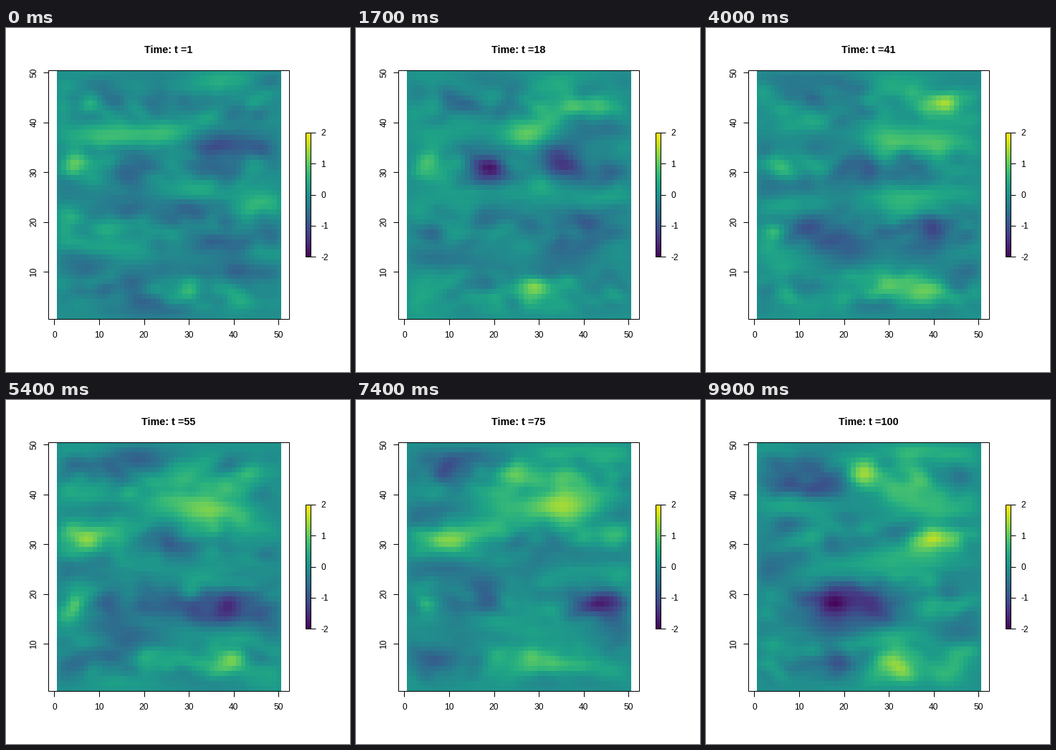
Write a matplotlib script that moves like this. It is 480x480 px and loops after 10 s.

```python
import numpy as np
import matplotlib.pyplot as plt
from matplotlib.animation import FuncAnimation
from matplotlib.patches import Rectangle

SIZE, CELLS, STEPS = 480, 50, 100
LIFE = 16        # steps over which an anomaly swells and fades
MEMORY = 0.93    # step-to-step correlation of the random part
SPREAD = 0.27    # strength of the random part
PT = 0.72        # points per pixel

# Main anomalies by row: x, height, width, step of the peak, drift per step
BANDS = {
    44: [(10, -.8, 4, 30, 0), (43, 1.3, 3.5, 43, 0), (35, .9, 4, 75, 0),
         (25, 1.3, 3.5, 91, 0), (9, -.8, 4.5, 90, 0)],
    37: [(27, 1.3, 5, 22, .1), (35, 1.1, 7, 69, 0)],
    31: [(19, -1.7, 3.5, 22, .1), (36, -1.7, 3.5, 16, 0), (5, 1.2, 3, 18, 0),
         (25, -1.1, 2.5, 56, 0), (10, 1.7, 4, 75, .1), (42, 1.6, 3.8, 92, -.2)],
    18: [(6, -.8, 3, 19, 0), (38, -1.3, 6, 50, 0), (17, -.8, 6, 46, .3),
         (4.5, 1.5, 2, 55, 0), (36, -2, 4.5, 86, -.7), (17, -1.4, 4.5, 101, 0)],
    6: [(30, 1, 3, 1, 0), (38, .8, 4, 48, 0), (31, 1.6, 4, 93, 0),
        (14, -.8, 5, 88, .3)],
}

plt.rcParams["font.family"] = "Liberation Sans"
grid = np.arange(1, CELLS + 1)
gx, gy = np.meshgrid(grid, grid)


def anomalies(t):
    z = np.zeros((CELLS, CELLS))
    for y, bumps in BANDS.items():
        for x, height, width, peak, drift in bumps:
            dt = t - peak
            r2 = (((gx - x - drift * dt) / width) ** 2
                  + ((gy - y) / (1.8 + .15 * width)) ** 2)
            z += height * np.exp(-.5 * (dt / LIFE) ** 2) / (1 + r2 / 3) ** 2
    return z


def smoother(s):
    k = np.exp(-.5 * ((grid[:, None] - grid) / s) ** 2)
    return k / np.sqrt((k ** 2).sum(1, keepdims=True))


def noise_path():
    """Autoregressive noise: long streaks, plus small spots along the bands."""
    rng = np.random.default_rng(7)
    wide, flat = smoother(5), smoother(1.8)
    spot_x, spot_y = smoother(1.6), smoother(1.1)
    share = .25 - .25 * np.cos(2 * np.pi * grid[:, None] / 12.5)
    z = None
    for _ in range(STEPS):
        a, b = rng.standard_normal((2, CELLS, CELLS))
        shock = (np.sqrt(1 - share) * (flat @ a @ wide.T)
                 + np.sqrt(share) * (spot_y @ b @ spot_x.T))
        z = shock if z is None else MEMORY * z + np.sqrt(1 - MEMORY ** 2) * shock
        yield SPREAD * z


# The field is held near zero along its edges.
edge = np.tanh(np.minimum(grid, CELLS + 1 - grid) / 2)
taper = np.outer(edge, edge)
fields = [taper * (anomalies(t) + n) for t, n in enumerate(noise_path(), 1)]

fig = plt.figure(figsize=(SIZE / 100, SIZE / 100), dpi=100, facecolor="white")
ax = fig.add_axes([0, 0, 1, 1])
ax.axis("off")


def line(xs, ys):
    ax.plot(xs, ys, color="black", lw=PT, solid_capstyle="butt", zorder=3)


def label(x, y, text, size=12, **kw):
    return ax.text(x, y, text, fontsize=size * PT, va="baseline", **kw)


def frame(x0, y0, x1, y1):
    ax.add_patch(Rectangle((x0, y0), x1 - x0, y1 - y0, fill=False,
                           ec="black", lw=PT, zorder=3))


def raster(z, box):
    return ax.imshow(z, extent=box, origin="lower", aspect="auto",
                     interpolation="nearest", cmap="viridis", vmin=-2, vmax=2)


image = raster(fields[0], (71, 384, 406, 59))
raster(np.linspace(-2, 2, 128)[:, None], (418, 425, 320, 146))
frame(59, 59, 395, 406)
frame(418, 146, 425, 319)

for v in range(0, 51, 10):
    x, y = 67.4 + 6.26 * v, 409.5 - 6.95 * v
    line([x, x], [406, 414])
    label(x, 432, str(v), ha="center")
    if v:
        line([52, 59], [y, y])
        label(42.5, y, str(v), ha="center", rotation=90,
              rotation_mode="anchor")
for v in range(-2, 3):
    y = 232.6 - 43.35 * v
    line([425, 432], [y, y])
    label(439, y + 4.3, str(v), ha="left")

title = label(227, 35, "", 14.4, ha="center", weight="bold")
ax.set_xlim(0, SIZE)
ax.set_ylim(SIZE, 0)


def update(i):
    image.set_data(fields[i])
    title.set_text(f"Time: t ={i + 1}")
    return image, title


anim = FuncAnimation(fig, update, frames=STEPS, interval=100,
                     repeat=True, repeat_delay=0)
plt.show()
```
